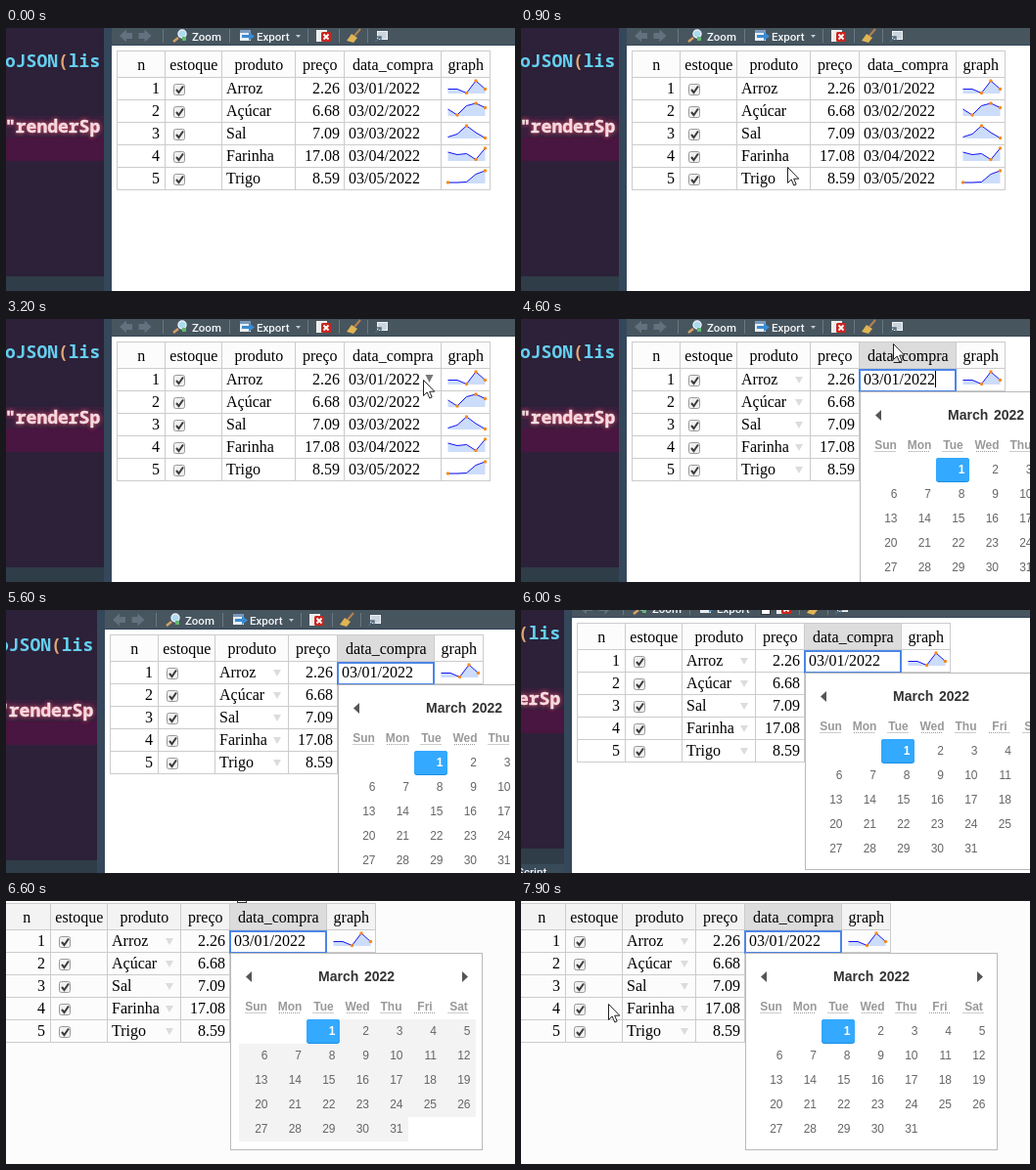
These frames come from a looping animation (520x269 px, 8000 ms). An HTML page:

```html
<!DOCTYPE html>
<html lang="pt">
<head>
<meta charset="utf-8">
<style>
  html, body { margin: 0; width: 100%; height: 100%; overflow: hidden; background: #fff; }
  svg { display: block; }
  .cell { font: 16px "Liberation Serif", serif; }
  .code { font: bold 18px "Noto Sans Mono", "DejaVu Sans Mono", monospace; }
  .glow { text-shadow: 0 0 5px #e0506a; stroke: #fbf0f2; stroke-width: .4px; }
  .bar { font: 500 11.5px Roboto, sans-serif; fill: #f4f6f8; }
  .day { font: 12px "Liberation Sans", sans-serif; fill: #666; }
  .title { font: bold 14px "Liberation Sans", sans-serif; fill: #333; }
  .week { font: bold 12px "Liberation Sans", sans-serif; fill: #999; }
</style>
</head>
<body>
<svg id="stage" width="520" height="269" viewBox="0 0 520 269"></svg>
<script>
const LOOP = 8000, STEP = 100;
const COLS = [113, 162, 220, 295, 345, 444, 494];
const HEADS = ["n", "estoque", "produto", "preço", "data_compra", "graph"];
const ROWS = [
  { name: "Arroz", price: "2.26", line: [62, 62, 66, 53.5, 62], dots: [2, 3, 4] },
  { name: "Açúcar", price: "6.68", line: [82.5, 88.5, 79, 76.5, 81], dots: [1, 3, 4] },
  { name: "Sal", price: "7.09", line: [111, 108, 99.5, 106.5, 112], dots: [2, 4] },
  { name: "Farinha", price: "17.08", line: [126.5, 129, 128, 134, 122.5], dots: [3, 4] },
  { name: "Trigo", price: "8.59", line: [157.5, 157.5, 157, 149, 145.5], dots: [0, 4] }
];

const rect = (x, y, w, h, fill, extra = "") =>
  `<rect x="${x}" y="${y}" width="${w}" height="${h}" fill="${fill}" ${extra}/>`;
const path = (d, fill, extra = "") => `<path d="${d}" fill="${fill}" ${extra}/>`;
const text = (x, y, cls, str, extra = "") => `<text x="${x}" y="${y}" class="${cls}" ${extra}>${str}</text>`;
const group = (id, body, extra = "") => `<g id="${id}" ${extra}>${body}</g>`;
const END = 'text-anchor="end"', MID = 'text-anchor="middle"';
const downArrow = (x, y, w, h) => `M${x} ${y}h${w}l${-w / 2} ${h}z`;

function editor() {
  return rect(-10, -40, 111, 330, "#2c2138")
    + rect(-10, 90, 111, 22, "#38203e") + rect(-10, 112, 111, 24, "#481640")
    + text(-1, 40, "code", 'oJSON<tspan fill="#e0a878">(</tspan>lis', 'fill="#66d0f0"')
    + text(-1, 107, "code glow", '"renderSp', 'fill="#fbf0f2"')
    + rect(-10, 254, 111, 16, "#2f3d49") + rect(-10, 270, 111, 30, "#394a59")
    + text(52, 282, "bar", "Script")
    + rect(100, -40, 8, 360, "#35475a");
}

function toolbar() {
  const seps = [160, 228, 308, 340, 369].map(x => rect(x, 1, 1, 14, "#6a7883")).join("");
  const arrow = "M-6.5 -3h6v-3.5l7 6.5l-7 6.5v-3.5h-6z";
  return rect(108, -40, 600, 58, "#47555f") + rect(108, 17, 600, 1, "#35475a") + seps
    + path(arrow, "#62717d", 'transform="translate(122.5 8) scale(-1 1)"')
    + path(arrow, "#62717d", 'transform="translate(142 8)"')
    + path("M176 10l-5 4", "none", 'stroke="#d4a265" stroke-width="2.5"')
    + `<circle cx="180" cy="6" r="4" fill="#a8dcec" stroke="#eef" stroke-width="1.4"/>`
    + rect(180, 9, 4, 4, "#61b86f") + text(190, 12.5, "bar", "Zoom")
    + rect(239, 2, 11, 11, "#e8edf2") + rect(239, 2, 11, 3, "#7a99bd")
    + path("M241 7h7v-3l6 4.5l-6 4.5v-3h-7z", "#3a8bd0") + text(256, 12.5, "bar", "Export")
    + path(downArrow(296, 7, 5, 3), "#c3ccd4")
    + rect(317, 2, 11, 12, "#eee") + rect(322, 4, 10, 10, "#c92620", 'rx="1.5"')
    + path("M324.5 6.5l5 5m0 -5l-5 5", "none", 'stroke="#fff" stroke-width="1.8"')
    + path("M362 1l-6 7", "none", 'stroke="#b58150" stroke-width="2"')
    + path("M353 6l6 4l-4 5l-7 -2z", "#e1b454")
    + rect(379.5, 3.5, 10, 8, "#cbd5de", 'stroke="#eef2f5"')
    + path("M377 14l6 -5m-4 0h4v4", "none", 'stroke="#536b82" stroke-width="1.4"');
}

function sparkline({ line, dots }, i) {
  const x = k => 451.5 + k * 9.5;
  const d = "M" + line.map((y, k) => `${x(k)} ${y}`).join("L");
  const base = 66.5 + 23 * i;
  const body = path(`${d}L${x(4)} ${base}H${x(0)}z`, "#ccdcfb")
    + path(d, "none", 'stroke="#1515f0"')
    + dots.map(k => `<circle cx="${x(k)}" cy="${line[k]}" r="1.7" fill="#f58a1c"/>`).join("");
  return `<g transform="translate(0 .5)">${body}</g>`;
}

function row(r, i) {
  const y = 67 + 23 * i, top = y - 9.5;
  return text(157, y, "cell", i + 1, END)
    + rect(171.5, top, 11, 11, "#f0f0f0", 'rx="2" stroke="#999"')
    + path(`M174 ${top + 5.5}l2.5 3l4.5 -6.5`, "none", 'stroke="#3c3c3c" stroke-width="2"')
    + text(225, y, "cell", r.name) + text(341, y, "cell", r.price, END)
    + text(350, y, "cell", `03/0${i + 1}/2022`) + sparkline(r, i);
}

function table() {
  const lines = COLS.map(x => `M${x + .5} 23V166`).join("")
    + [23, 50, 73, 96, 119, 142, 165].map(y => `M113 ${y + .5}H495`).join("");
  return rect(113, 23, 381, 27, "#fcfcfc", 'id="head"')
    + rect(346, 23, 98, 27, "#dcdcdc", 'id="headOn"')
    + path(lines, "none", 'stroke="#ccc"')
    + HEADS.map((h, i) => text((COLS[i] + COLS[i + 1]) / 2 + .8, 43, "cell", h, MID)).join("")
    + ROWS.map(row).join("")
    + group("hover", path(downArrow(428.5, 57, 8, 8), "#777"))
    + group("marks", ROWS.map((r, i) => path(downArrow(280, 59 + 23 * i, 8, 7), "#dcdcdc")).join(""));
}

function calendar() {
  const left = i => 355 + 34.5 * i;
  const week = ["Sun", "Mon", "Tue", "Wed", "Thu", "Fri", "Sat"];
  let names = "", shade = "", days = "";
  week.forEach((w, i) => {
    const x = left(i) + 17.5;
    names += text(x, 133, "week", w, MID)
      + path(`M${x - 11} 135.5h22`, "none", 'stroke="#999" stroke-dasharray="1 1"');
  });
  for (let d = 1; d <= 31; d++) {
    const slot = d + 1, x = left(slot % 7), y = 142 + 25 * Math.floor(slot / 7);
    const on = d === 1;
    if (!on) shade += rect(x, y, 34.5, 25, "#f3f3f3");
    else days += rect(x, y, 34, 25, "#178fe5", 'rx="3"') + rect(x, y, 34, 24, "#33a9ff", 'rx="3"');
    days += text(x + 29.5, y + 16, "day", d, END + (on ? ' style="fill:#fff;font-weight:bold"' : ""));
  }
  return rect(346.5, 74.5, 257, 201, "#fff", 'stroke="#b9b9b9"')
    + path("M368 93v11l-6 -5.5z", "#555") + path("M583 93v11l6 -5.5z", "#555")
    + text(436, 103, "title", "March") + text(483, 103, "title", "2022")
    + names + group("shade", shade, 'shape-rendering="crispEdges"') + days;
}

const popup = rect(346, 52, 98, 22, "#fff", 'stroke="#4c86e6" stroke-width="2"')
  + text(350, 67, "cell", "03/01/2022") + rect(423, 53, 1, 17, "#000", 'id="caret"') + calendar();

document.getElementById("stage").innerHTML =
  group("view", rect(100, -40, 700, 400, "#fff", 'id="page"') + editor() + toolbar() + table() + group("popup", popup))
  + group("grip", rect(.5, -3.5, 9, 5, "#fff", 'stroke="#333"'))
  + group("pointer", path("M.5 .5V16.5L4.2 13L6.8 19L9.2 18L6.7 12.2H11.8Z", "#fff", 'stroke="#222"'))
  + group("beam", path("M-3 -8h2.5l.5 1l.5 -1h2.5M0 -7V7M-3 8h2.5l.5 -1l.5 1h2.5", "none", 'stroke="#222"'));

// Keys are [time, x, y].
const CAMERA = [[5500, 0, 0], [5600, -7, 2], [5800, -30, -2], [6000, -56, -10], [6300, -99, -18], [6600, -117, -21]];
const ENTER = [[200, 440, -22], [500, 390, 70], [800, 300, 150], [1100, 215, 125], [1400, 190, 110],
  [1500, 190, 110], [1700, 148, 78], [1800, 162, 67], [2100, 310, 72], [2400, 430, 56], [2700, 426, 62]];
const LEAVE = [[4400, 426, 62], [4600, 380, 25], [4900, 250, -22]];
const BACK = [[7400, 240, -22], [7600, 190, 40], [7900, 89, 105]];
const GRIP = [[6000, 245, 3], [6500, 236, 0]];

function at(keys, t) {
  if (t <= keys[0][0]) return keys[0].slice(1);
  for (let i = 1; i < keys.length; i++) {
    const [t0, x0, y0] = keys[i - 1], [t1, x1, y1] = keys[i];
    if (t <= t1) {
      const k = (t - t0) / (t1 - t0);
      return [Math.round(x0 + (x1 - x0) * k), Math.round(y0 + (y1 - y0) * k)];
    }
  }
  return keys[keys.length - 1].slice(1);
}

const el = id => document.getElementById(id);
const show = (id, on) => el(id).setAttribute("display", on ? "inline" : "none");
const move = (id, [x, y]) => el(id).setAttribute("transform", `translate(${x} ${y})`);

function draw(time) {
  const t = Math.floor((time % LOOP) / STEP) * STEP;
  const open = t >= 3300, late = t >= 6500;
  const typing = open && t < 4500;
  move("view", at(CAMERA, t));
  ["popup", "marks", "headOn"].forEach(id => show(id, open));
  show("hover", t >= 2400 && !open);
  show("caret", (t >= 3300 && t < 3800) || (t >= 4300 && t < 4800));
  show("shade", late && t < 7500);
  el("head").setAttribute("fill", late ? "#f3f3f3" : "#fcfcfc");
  el("page").setAttribute("fill", late ? "#fcfcfc" : "#fff");
  move("grip", at(GRIP, t));
  show("grip", t >= 6000 && t < 7300);
  move("pointer", at(t < 4400 ? ENTER : t < 7000 ? LEAVE : BACK, t));
  show("pointer", !typing);
  move("beam", [427, 62]);
  show("beam", typing);
}

const start = performance.now();
function frame() {
  draw(performance.now() - start);
  requestAnimationFrame(frame);
}
frame();
</script>
</body>
</html>
```
